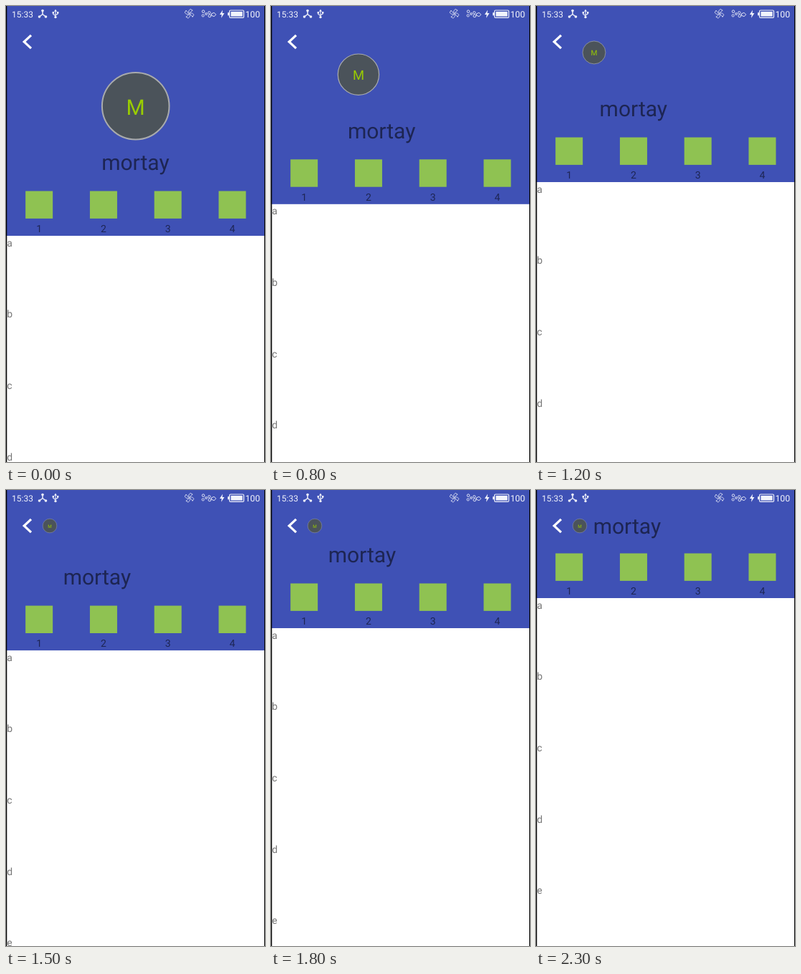
Write an HTML page that moves like this. It is 361 px wide and 637 px high and loops after 2.4 s.

```html
<!DOCTYPE html>
<html lang="en">
<head>
<meta charset="utf-8">
<title>Collapsing profile header</title>
<style>
  html, body { margin: 0; width: 100%; height: 100%; overflow: hidden; background: #fff; }
  svg {
    display: block; width: 361px; height: 637px;
    font-family: Roboto, "Liberation Sans", sans-serif;
    text-rendering: geometricPrecision;
  }
  .soft { fill: #000; fill-opacity: .54; }
  .mid { text-anchor: middle; }
  .line { fill: none; stroke: #f1f3fb; }
  .solid { fill: #f1f3fb; }
</style>
</head>
<body>
<svg viewBox="0 0 361 637">
  <rect width="361" height="637" fill="#3f51b5"/>

  <g id="page">
    <rect y="321" width="361" height="900" fill="#fff"/>
    <g id="tabs" font-size="14"></g>
    <g id="rows" font-size="14"></g>
  </g>

  <text id="name" class="soft" font-size="30">mortay</text>

  <g id="avatar">
    <circle r="46.8" fill="#4b535a" stroke="#a9abac" stroke-width="2"/>
    <text class="mid" y="12.3" font-size="30" fill="#99cc00">M</text>
  </g>

  <path d="M35 40.8 25.2 50 35 59.2" fill="none" stroke="#fff" stroke-width="3.2"/>

  <g id="status" font-size="12">
    <text class="solid" x="8" y="15.5">15:33</text>
    <text class="solid" x="333.4" y="15.5" font-size="12.3">100</text>

    <!-- three-way node -->
    <path class="line" d="M51 7V11.5L46.5 15M51 11.5 55.5 15" stroke-width="1.5"/>
    <g class="solid">
      <circle cx="51" cy="6.5" r="1.8"/>
      <circle cx="46.5" cy="15" r="1.8"/>
      <circle cx="55.5" cy="15" r="1.8"/>
    </g>

    <!-- cable -->
    <path class="line" d="M69 7V15M65.8 9V11.5L69 13.5M72.2 9V11L69 13" stroke-width="1.1"/>
    <path class="solid" d="M69 4.5 71 7.8H67ZM64.6 8h2.4v2.4h-2.4zM71 8h2.4v2.4h-2.4z"/>
    <circle class="solid" cx="69" cy="15.6" r="1.7"/>

    <g id="fan" class="line" stroke-width=".9" opacity=".85"></g>

    <!-- cluster of small rings -->
    <g class="line" stroke-width="1" opacity=".9">
      <circle cx="275" cy="7.6" r="1.8"/>
      <circle cx="274.6" cy="13.4" r="1.6"/>
      <circle cx="279" cy="11" r="1.4"/>
      <circle cx="283.3" cy="9.3" r="1.7"/>
      <circle cx="283.8" cy="13.8" r="1.9"/>
      <path d="M286.5 10.7 290 9.4 292.8 12 290 14.6 286.5 13.3Z"/>
    </g>

    <path class="solid" d="M302 5.5 297.8 12h2.8L300 16.8 304.4 10h-2.9z"/>
    <rect class="line" x="311.5" y="6" width="20" height="10.4" rx="1.5" stroke-width="1.2"/>
    <rect class="solid" x="313.4" y="7.9" width="16.2" height="6.6"/>
    <rect class="solid" x="309" y="9.2" width="2" height="4"/>
  </g>

  <path d="M0 0H1.3V637H0ZM360 0H361V637H360Z"/>
</svg>

<script>
const LOOP = 2400, TICK = 100;
// [time in ms, scroll offset in px]
const SCROLL = [
  [500, 0], [600, 9.3], [800, 44.2], [1200, 75],
  [1500, 96.9], [1800, 128], [2300, 170]
];
const SHRINK_END = 90;

const byId = id => document.getElementById(id);
const mix = (a, b, p) => a + (b - a) * p;

function add(parent, tag, attrs, text = "") {
  const el = document.createElementNS("http://www.w3.org/2000/svg", tag);
  for (const key in attrs) el.setAttribute(key, attrs[key]);
  el.textContent = text;
  byId(parent).append(el);
}

function build() {
  for (let i = 0; i < 4; i++) {
    const x = 1.3 + 89.75 * (i + .5);
    add("tabs", "rect", { x: x - 19, y: 258.5, width: 38, height: 38.4, fill: "#8fc252" });
    add("tabs", "text", { x, y: 316, class: "soft mid" }, i + 1);
  }
  [..."abcdef"].forEach((letter, i) =>
    add("rows", "text", { x: 1.2, y: 335.7 + 99.6 * i, class: "soft" }, letter));
  for (let i = 0; i < 4; i++) {
    add("fan", "path", {
      d: "M0 -.5C-2 -2 -1.5 -5 .5 -6.5L3.8 -5.2C1.5 -4 2 -2 0 -.5Z",
      transform: `translate(255.5 10.7) rotate(${10 + 90 * i})`
    });
  }
}

function scrollAt(time) {
  if (time <= SCROLL[0][0]) return 0;
  const i = SCROLL.findIndex(([t]) => t >= time);
  const [t0, d0] = SCROLL[i - 1], [t1, d1] = SCROLL[i];
  return mix(d0, d1, (time - t0) / (t1 - t0));
}

function place(id, x, y, scale = 1) {
  byId(id).setAttribute("transform", `translate(${x} ${y}) scale(${scale})`);
}

function draw(now) {
  const time = Math.floor((now % LOOP) / TICK) * TICK;
  const d = scrollAt(time);
  const p = Math.min(1, d / SHRINK_END);
  place("page", 0, -d);
  place("name", mix(133.2, 79.7, p), Math.max(229 - d, 60.5));
  place("avatar", mix(180.7, 61, p), mix(139.7, 50, p), mix(1, .21, p));
}

build();
const start = performance.now();
function loop() {
  draw(performance.now() - start);
  requestAnimationFrame(loop);
}
loop();
</script>
</body>
</html>
```
